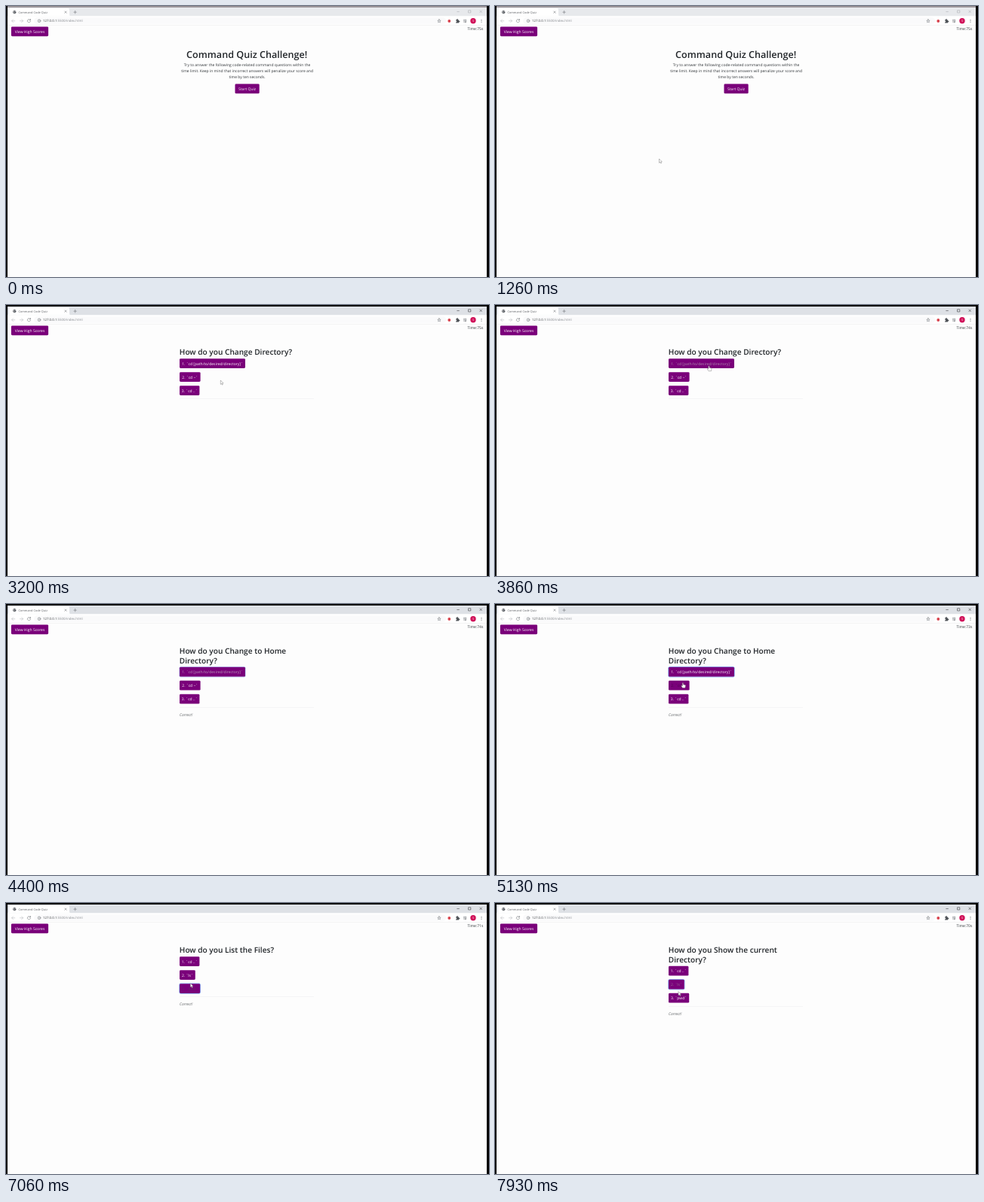
Write an HTML page that moves like this. It is 640 px wide and 360 px high and loops after 8000 ms.

```html
<!DOCTYPE html>
<html lang="en">
<head>
<meta charset="utf-8">
<title>Command Code Quiz</title>
<style>
html, body { margin: 0; width: 100%; height: 100%; overflow: hidden; background: #fdfdfd; }
svg { display: block; width: 100vw; height: 100vh; }
text { font-family: "Open Sans", "Noto Sans", sans-serif; font-size: 5.03px; fill: #33373b; text-rendering: geometricPrecision; white-space: pre; }
.h1 { font-size: 12.6px; font-weight: 600; fill: #212529; }
.h2 { font-size: 10.12px; font-weight: 600; fill: #212529; }
.tab { font-size: 3.9px; fill: #5a5d61; }
.url { font-size: 4.35px; fill: #85898e; }
.mid { text-anchor: middle; }
.end { text-anchor: end; }
.btn text { fill: #fff; text-anchor: middle; }
.btn .face { fill: #7a007a; }
.btn .ring { fill: none; stroke: #4a9bff; stroke-width: 1; }
.line { fill: none; stroke: #6b6f74; stroke-width: .55; stroke-linecap: round; stroke-linejoin: round; }
.pointer { fill: #fff; stroke: #555; stroke-width: .38; stroke-linejoin: round; }
</style>
</head>
<body>
<svg id="stage" viewBox="0 0 640 360" xmlns="http://www.w3.org/2000/svg">
  <rect width="640" height="360"/>
  <rect id="edge" x="2" width="635" height="2"/>
  <rect x="2" y="2" width="635" height="358" fill="#fdfdfd"/>

  <!-- browser window -->
  <rect id="strip" x="2" y="2" width="635" height="11.6"/>
  <path d="M2 13.6Q4 13.6 4 11.6V5Q4 3 6 3H82Q84 3 84 5V11.6Q84 13.6 86 13.6Z" fill="#fff"/>
  <rect x="2" y="13.4" width="635" height="11.8" fill="#fff"/>
  <rect x="37" y="15.2" width="546" height="9" rx="4.5" fill="#fafafb"/>
  <rect x="2" y="25.1" width="635" height=".5" fill="#e6e6e8"/>
  <circle cx="11.3" cy="8.2" r="2.1" fill="#5f6368"/>
  <path d="M9.8 7.2l1.4.6-.5 1.4zM12 6.6l1 .5-.4 1z" fill="#fff"/>
  <text class="tab" x="16.4" y="9.6">Command Code Quiz</text>
  <path class="line" d="M77.8 7l2.4 2.4M80.2 7l-2.4 2.4M89.8 8.2h3.6M91.6 6.4v3.6"/>
  <g id="controls" fill="none" stroke-width=".5">
    <path d="M597.4 7.6h3.4M612.6 5.8h3.2v3.2h-3.2zM627.6 5.8l3.2 3.2M630.8 5.8l-3.2 3.2"/>
  </g>
  <path class="line" d="M11.8 19.8H7.6M9.5 17.9L7.6 19.8l1.9 1.9" style="stroke:#b4b6b9"/>
  <path class="line" d="M18.4 19.8h4.2M20.7 17.9l1.9 1.9-1.9 1.9" style="stroke:#b4b6b9"/>
  <path class="line" d="M32.2 18.6A2.1 2.1 0 1 0 32.5 20.4M32.5 17.4v1.5H31"/>
  <circle class="line" cx="44" cy="19.8" r="1.9" style="stroke-width:.5"/>
  <path class="line" d="M44 19.6v1.1M44 18.7v.05" style="stroke-width:.5"/>
  <text class="url" x="49" y="21.4"><tspan fill="#3c4043">127.0.0.1</tspan>:5500/index.html</text>
  <path id="star" class="line" style="stroke-width:.5"/>
  <circle cx="587.3" cy="20" r="1.9" fill="#d8434e"/>
  <path d="M596 18.6h1.2a.9.9 0 1 1 1.6 0h1.2v1.2a.9.9 0 1 1 0 1.5v1.1h-4v-1.2a.8.8 0 1 0 0-1.4z" fill="#4d5156"/>
  <path class="line" d="M606.4 18.4h3M606.4 19.8h2M606.4 21.2h1.4M609.6 18.4v2.7"/>
  <circle cx="608.9" cy="21.3" r=".8" fill="#5f6368"/>
  <circle cx="619" cy="19.8" r="3.7" fill="#d0135a"/>
  <text class="mid" x="619" y="21.2" style="font-size:3.8px;fill:#fff">S</text>
  <g fill="#5f6368"><circle cx="630" cy="18.2" r=".5"/><circle cx="630" cy="19.8" r=".5"/><circle cx="630" cy="21.4" r=".5"/></g>

  <!-- page -->
  <g class="btn"><rect class="face" x="6.9" y="27.4" width="49.2" height="12.8" rx="1.4"/><text x="31.5" y="35.7">View High Scores</text></g>
  <text id="timer" class="end" x="632.4" y="32.3"></text>
  <g id="intro">
    <text class="h1 mid" x="319.2" y="69.2">Command Quiz Challenge!</text>
    <text class="mid" x="319.6" y="80.4">Try to answer the following code-related command questions within the</text>
    <text class="mid" x="319.6" y="88.4">time limit. Keep in mind that incorrect answers will penalize your score and</text>
    <text class="mid" x="319.6" y="96.4">time by ten seconds.</text>
  </g>
  <g id="quiz">
    <text id="line0" class="h2" x="229.8" y="66.4"></text>
    <text id="line1" class="h2" x="229.8" y="79"></text>
    <rect id="rule" x="230" width="178" height=".4" fill="#e9e9ea"/>
    <text id="verdict" x="230" font-style="italic" style="fill:#5d6063">Correct!</text>
  </g>
  <g id="buttons"></g>
  <path id="arrow" class="pointer" d="M0 0V5.4L1.25 4.25 2.1 6.1 3 5.7 2.2 3.9H3.8Z"/>
  <path id="hand" class="pointer" d="M-.6 .5Q0 -.3 .6 .5V2.6L3 3.2Q3.7 3.4 3.6 4.2L3 7H-.5L-2.2 4.6Q-2.2 3.7 -1.4 3.9L-.6 4.6Z"/>
</svg>
<script>
const LOOP = 8000, FADE = 150, LINE = 12.6, BTN_H = 12.8;
const $ = id => document.getElementById(id);

const path = ['`cd [path/to/desired/directory]`', 87];
const home = ['`cd ~`', 27.6], up = ['`cd ..`', 26.4];
const list = ['`ls`', 20.8], where = ['`pwd`', 27.2];

// focus is the option that was clicked to get here
const screens = [
  { at: 0, lines: [] },
  { at: 2460, lines: ['How do you Change Directory?'], options: [path, home, up] },
  { at: 4320, lines: ['How do you Change to Home', 'Directory?'], options: [path, home, up], focus: 1 },
  { at: 5530, lines: ['How do you Move to One Directory', 'Up?'], options: [path, home, up], focus: 2 },
  { at: 6620, lines: ['How do you List the Files?'], options: [up, list, where], focus: 3 },
  { at: 7670, lines: ['How do you Show the current', 'Directory?'], options: [up, list, where], focus: 2 }
];

// pointer stops: time, x, y
const stops = [
  [930, 204, 213], [1260, 217.5, 203], [1730, 306, 127], [1950, 316, 112],
  [2260, 317, 110], [2900, 317, 110], [3080, 284.3, 100], [3220, 284.3, 100],
  [3600, 286, 92], [3950, 283, 78.5], [4430, 283, 78.5], [4750, 262, 92],
  [5050, 249, 104.3], [5560, 248.5, 106], [5950, 247, 120.4], [6700, 246.5, 121.5],
  [7250, 243.5, 101], [7660, 243.5, 101.3], [7760, 243.4, 104.5], [7930, 243, 117.6], [8000, 243, 121]
];

const screenAt = t => screens.filter(s => s.at <= t).pop();

function pointerAt(t) {
  if (t < stops[0][0]) return null;
  const i = stops.findIndex(s => s[0] > t);
  const [t0, x0, y0] = stops[i - 1], [t1, x1, y1] = stops[i];
  const k = (t - t0) / (t1 - t0), e = k * k * (3 - 2 * k);
  return { x: x0 + (x1 - x0) * e, y: y0 + (y1 - y0) * e };
}

// slot 0 is the start button, slots 1 to 3 the options
function boxOf(screen, slot) {
  if (!screen.options) return slot ? null : { x: 303.5, y: 103.5, w: 32.2, label: 'Start Quiz' };
  if (!slot) return null;
  const [code, w] = screen.options[slot - 1];
  const y = 71.2 + (screen.lines.length - 1) * LINE + (slot - 1) * 18;
  return { x: 230, y, w, label: slot + '. ' + code };
}

function hoverAt(t) {
  const p = pointerAt(t), screen = screenAt(t);
  return p ? [0, 1, 2, 3].findIndex(slot => {
    const b = boxOf(screen, slot);
    return b && p.x > b.x && p.x < b.x + b.w && p.y > b.y && p.y < b.y + BTN_H;
  }) : -1;
}

// share of the last FADE ms that each slot was hovered
function hoverShares(t) {
  const n = 15, shares = [0, 0, 0, 0];
  for (let i = 0; i < n; i++) {
    const slot = hoverAt(Math.max(0, t - FADE * i / n));
    if (slot >= 0) shares[slot] += 1 / n;
  }
  return shares;
}

function set(el, attrs) {
  for (const name in attrs) el.setAttribute(name, attrs[name]);
}

function show(el, on) {
  el.style.display = on ? '' : 'none';
}

$('buttons').innerHTML = [0, 1, 2, 3].map(() =>
  '<g class="btn"><rect class="ring" rx="1.8"/><rect class="face" rx="1.4"/><text></text></g>').join('');
const buttons = [...$('buttons').children];

$('star').setAttribute('d', 'M' + Array.from({ length: 10 }, (_, i) => {
  const a = i * Math.PI / 5, r = i % 2 ? 1 : 2.3;
  return (574 + r * Math.sin(a)).toFixed(2) + ' ' + (20 - r * Math.cos(a)).toFixed(2);
}).join('L') + 'Z');

function drawButton(g, box, share, ringAlpha) {
  show(g, box);
  if (!box) return;
  const [ring, face, label] = g.children;
  set(ring, { x: box.x - .3, y: box.y - .3, width: box.w + .6, height: BTN_H + .6, opacity: ringAlpha });
  set(face, { x: box.x, y: box.y, width: box.w, height: BTN_H });
  set(label, { x: box.x + box.w / 2, y: box.y + 8.3 });
  label.textContent = box.label;
  const mix = to => Math.round(255 + (to - 255) * share);
  label.style.fill = `rgb(${mix(76)},${mix(8)},${mix(80)})`;
}

function drawPointer(t, screen) {
  const p = pointerAt(t), hand = hoverAt(t) >= 0;
  const onTitle = p && screen.options && p.x > 230 && p.x < 408 && p.y > 56 && p.y < 57 + screen.lines.length * LINE;
  show($('hand'), p && hand);
  show($('arrow'), p && !hand && !onTitle);
  if (p) set($(hand ? 'hand' : 'arrow'), { transform: `translate(${p.x} ${p.y})` });
}

function draw(t) {
  const screen = screenAt(t), started = !!screen.options;
  const drop = (screen.lines.length - 1) * LINE;

  // the window frame darkens once the window is active
  set($('edge'), { fill: started ? '#000' : '#9b9599' });
  set($('strip'), { fill: started ? '#dee1e6' : '#e7e9ec' });
  set($('controls'), { stroke: started ? '#202124' : '#a4a7ab' });
  $('timer').textContent = `Time:${75 - Math.max(0, Math.floor((t - 2520) / 1030))}s`;

  show($('intro'), !started);
  show($('quiz'), started);
  $('line0').textContent = screen.lines[0] || '';
  $('line1').textContent = screen.lines[1] || '';
  set($('rule'), { y: 124.6 + drop });
  set($('verdict'), { y: 136.4 + drop });
  show($('verdict'), screen.focus);

  const shares = hoverShares(t);
  const ring = .6 * Math.min(1, (t - screen.at) / FADE);
  buttons.forEach((g, slot) =>
    drawButton(g, boxOf(screen, slot), shares[slot], screen.focus === slot ? ring : 0));
  drawPointer(t, screen);
}

const start = performance.now();
function tick() {
  draw((performance.now() - start) % LOOP);
  requestAnimationFrame(tick);
}
tick();
</script>
</body>
</html>
```
